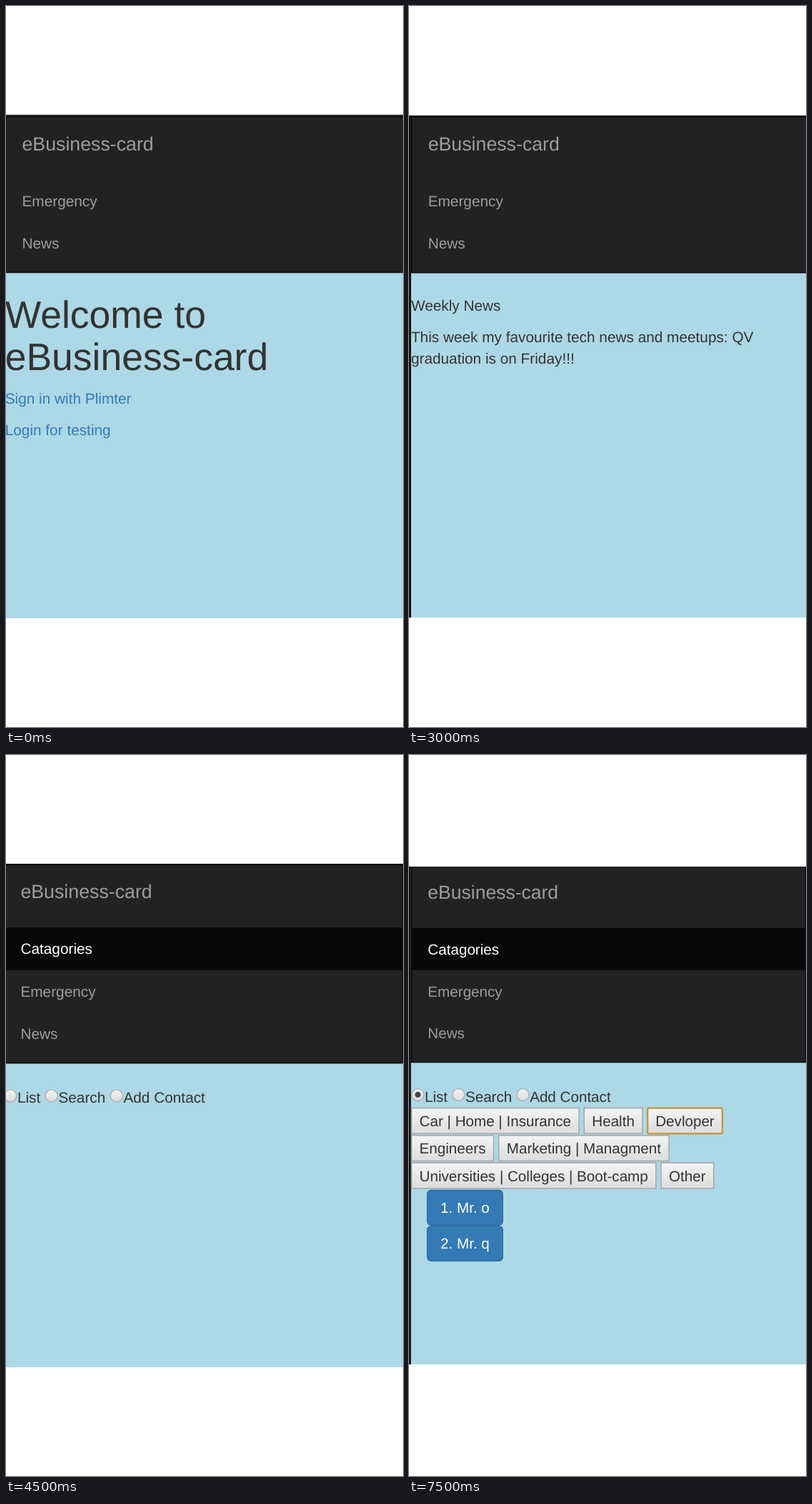
An HTML page that plays this animation: 556 px wide and 1008 px high, repeating every 8 s.

```html
<!DOCTYPE html>
<html lang="en">
<head>
<meta charset="utf-8">
<title>eBusiness-card</title>
<style>
  html, body { margin: 0; width: 100%; height: 100%; overflow: hidden; background: #fff; }
  #stage { display: block; width: 556px; height: 1008px; }
  text { font-family: "Liberation Sans", Arial, sans-serif; text-rendering: geometricPrecision; }
</style>
</head>
<body>
<svg id="stage" viewBox="0 0 556 1008"></svg>
<script>
const stage = document.getElementById('stage');
const ruler = document.createElement('canvas').getContext('2d');
ruler.font = '140px "Liberation Sans", Arial, sans-serif';
const widthOf = str => ruler.measureText(str).width / 10;
const SPACE = widthOf(' ');

const rect = (x, y, w, h, fill, extra = '') =>
  `<rect x="${x}" y="${y}" width="${w}" height="${h}" fill="${fill}" ${extra}/>`;
const text = (str, x, y, fill = '#333', size = 14) =>
  `<text x="${x}" y="${y}" fill="${fill}" font-size="${size}">${str}</text>`;
const paragraphs = (lines, y, fill) =>
  lines.map((line, i) => text(line, 0, y + 30 * i, fill)).join('');

// Navigation bar; all page coordinates start below its top border
function navbar(items, width, active) {
  const height = 65.5 + 40 * items.length;
  return rect(0, -1, width, height + 2, '#080808') +
    rect(1, 0, width - 2, height, '#222') +
    text('eBusiness-card', 16, 31, '#9d9d9d', 18) +
    items.map((item, i) => {
      const on = item === active, y = 58.5 + 40 * i;
      return (on ? rect(1, y, width - 2, 40, '#080808') : '') +
        text(item, 16, y + 25, on ? '#fff' : '#9d9d9d');
    }).join('');
}

function radios(checked) {
  let x = 0;
  return ['List', 'Search', 'Add Contact'].map(label => {
    const dot = label === checked ? `<circle cx="${x + 6.5}" cy="216.8" r="2.8" fill="#444"/>` : '';
    const out = `<circle cx="${x + 6.5}" cy="216.8" r="5.7" fill="url(#face)" stroke="#a8a8a8" stroke-width=".8"/>` +
      dot + text(label, x + 13, 223.5);
    x += 13 + widthOf(label) + SPACE;
    return out;
  }).join('');
}

const filters = [
  ['Car | Home | Insurance', 'Health', 'Devloper'],
  ['Engineers', 'Marketing | Managment'],
  ['Universities | Colleges | Boot-camp', 'Other']
];
const filterButtons = focused => filters.map((row, i) => {
  let x = 0;
  const y = 229 + 26 * i;
  return row.map(label => {
    const w = widthOf(label) + 16;
    const edge = label === focused
      ? 'stroke="#c4962f" stroke-width="1.5" rx="1"' : 'stroke="#a6a6a6"';
    const out = rect(x + .5, y + .5, w - 1, 24.2, 'url(#face)', edge) + text(label, x + 8, y + 17.8);
    x += w + SPACE;
    return out;
  }).join('');
}).join('');

const contacts = names => names.map((name, i) => {
  const label = `${i + 1}. ${name}`, y = 307 + 34 * i;
  return rect(15.5, y + .5, widthOf(label) + 25, 33, '#337ab7', 'stroke="#2e6da4" rx="3.5"') +
    text(label, 28, y + 22, '#fff');
}).join('');

const guest = ['Emergency', 'News'];
const member = ['Catagories', ...guest];

// x, y, scale: page placement; top, bottom: visible band; width: page width
const scenes = [
  { x: -1.3, y: 155.7, scale: 1.485, top: 152, bottom: 856, width: 378, items: guest,
    body: text('Welcome to', 0, 198.3, '#333', 36) + text('eBusiness-card', 0, 237.7, '#333', 36) +
      paragraphs(['Sign in with Plimter', 'Login for testing'], 269.5, '#337ab7') },
  { x: -1.3, y: 156, scale: 1.48, top: 154, bottom: 854, width: 375.6, items: guest,
    body: text('Important Emergency Numbers', 0, 187.8, '#333', 24) +
      paragraphs(['Police: 555', 'DC City Service: 550',
        'Child Abuse Hotline: (555) 555-0142', 'Corruption Hotline: (555) 555-0187',
        'Hate Crimes Hotline: (555) 555-0119', 'Command Information Center: (555) 555-0163',
        'Anonymously TEXT to VKD: 55550'], 217.5) },
  { x: 2.9, y: 156, scale: 1.485, top: 153, bottom: 855, width: 378, items: guest,
    body: paragraphs(['Weekly News', 'This week my favourite tech news and meetups: QV'], 181.5) +
      text('graduation is on Friday!!!', 0, 231.5) },
  { x: -3.4, y: 154.3, scale: 1.486, top: 152, bottom: 856, width: 376.6, items: member,
    body: radios() },
  { x: 1.2, y: 157.2, scale: 1.477, top: 151, bottom: 857, width: 375.7, items: member, foot: 1.4,
    body: radios('List') + rect(.2, 210.3, 13, 14, 'none', 'stroke="#d9b45f" stroke-width="1.2"') +
      filterButtons() + contacts(['Mr. o', 'Ms. h', 'Dr. k', 'Mr. q', 'Ms. u']) },
  { x: 2.8, y: 155.6, scale: 1.473, top: 156, bottom: 852, width: 375.7, items: member,
    body: radios('List') + filterButtons('Devloper') + contacts(['Mr. o', 'Mr. q']) }
];

function drawScene(s) {
  const h = s.bottom - s.top, foot = s.foot || 0;
  return `<svg y="${s.top}" width="556" height="${h}" viewBox="0 ${s.top} 556 ${h}" display="none">` +
    rect(0, s.top, 556, h, '#111') +
    rect(0, s.top, 556, Math.max(0, s.y - s.scale - s.top), '#292929') +
    `<g transform="translate(${s.x} ${s.y}) scale(${s.scale})">` +
    rect(0, 0, s.width, 500, '#add8e6') + navbar(s.items, s.width, 'Catagories') + s.body + '</g>' +
    rect(0, s.bottom - foot, 556, foot, '#111') + '</svg>';
}

stage.innerHTML = `<defs><linearGradient id="face" x2="0" y2="1">
  <stop stop-color="#f4f4f4"/><stop offset="1" stop-color="#dcdcdc"/></linearGradient></defs>` +
  scenes.map(drawScene).join('');
const views = [...stage.querySelectorAll('svg')];

function tick() {
  const current = Math.floor(performance.now() % 8000 / 1500);
  views.forEach((view, i) => view.setAttribute('display', i === current ? 'inline' : 'none'));
  requestAnimationFrame(tick);
}
tick();
</script>
</body>
</html>
```
